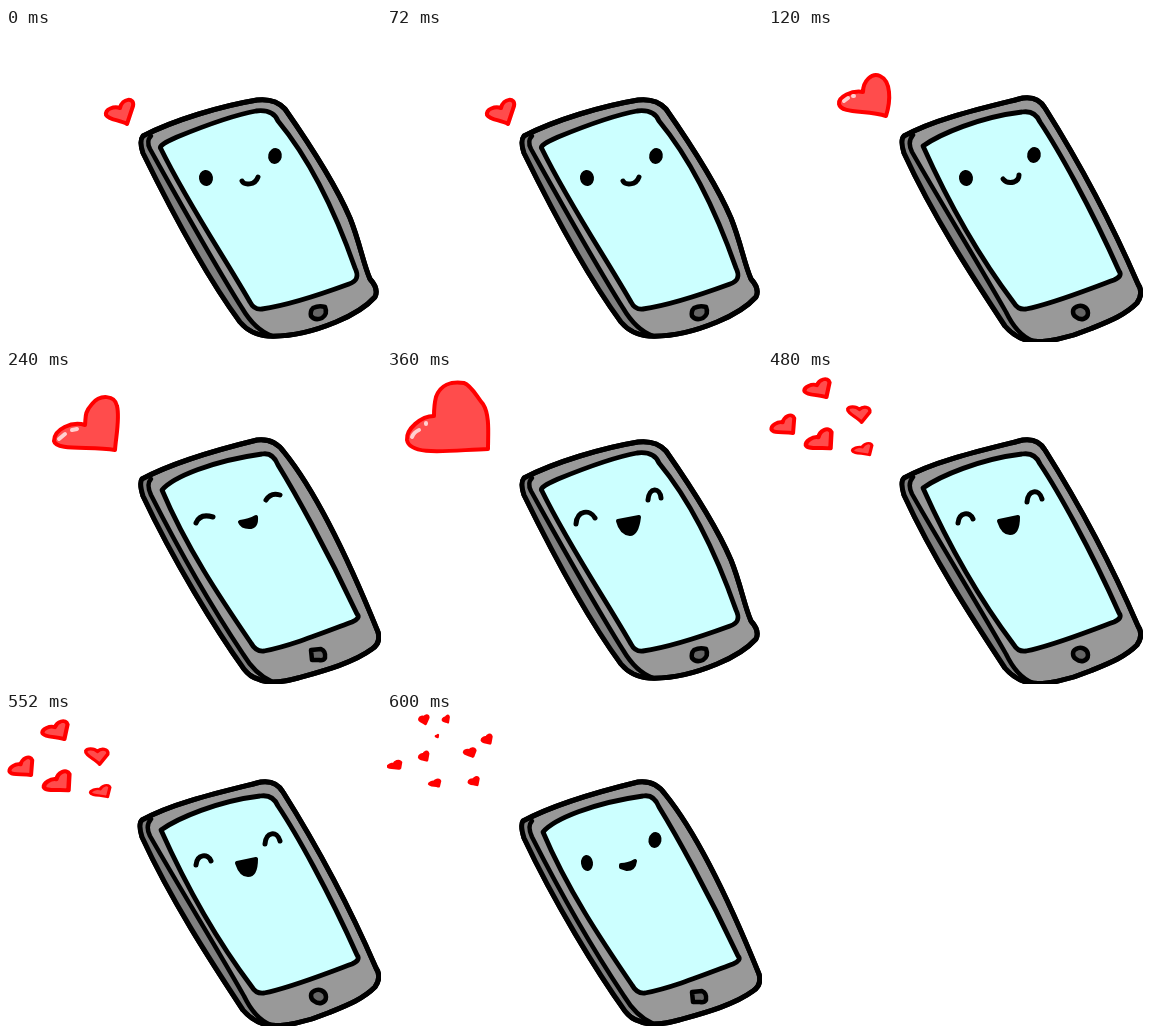
Recreate the animation shown at these times as an HTML page. Size 375 by 314 pixels, loop 720 ms.

```html
<!DOCTYPE html>
<html lang="en">
<head>
<meta charset="utf-8">
<title>Happy phone</title>
<style>
html, body { margin: 0; width: 100%; height: 100%; overflow: hidden; background: #fff; }
svg { display: block; width: 100%; height: 100%; }
path { stroke-linecap: round; stroke-linejoin: round; }
</style>
</head>
<body>
<svg id="stage" viewBox="0 0 375 314"></svg>
<script>
const HOLD = 120;
const path = (d, fill = 'none', stroke = '#000', width = 5) =>
  `<path d="${d}" fill="${fill}" stroke="${stroke}" stroke-width="${width}"/>`;
const oval = (x, y, rx, ry, tilt = 0) =>
  `<ellipse cx="${x}" cy="${y}" rx="${rx}" ry="${ry}" transform="rotate(${tilt} ${x} ${y})"/>`;

// Three wobbling drawings of the phone: case, front edge, screen, button
const phone = ([shell, edge, screen, button]) =>
  path(shell, '#999') +
  path(edge + ' L236 297 C205 250 166 184 137 124 Q133 111 138 108 Z', '#808080', 'none', 0) +
  path(shell) + path(edge, 'none', '#000', 4.5) +
  path(screen, '#cff', '#000', 4.8) + path(button, '#666', '#000', 4.5);

const bodies = [
  ['M137 108 C168 92 215 78 251 72 Q269 70 279 81 C302 114 329 155 344 190 C354 215 357 235 364 251 Q373 261 369 269 C360 279 347 287 330 294 C306 304 282 309 262 308 Q245 307 234 294 C203 252 166 184 137 125 Q133 113 137 108 Z',
   'M145 108 Q140 113 144 121 C177 180 207 234 236 280 Q249 302 266 308',
   'M155 121 C152 118 160 114 171 109 C198 98 228 87 250 83 Q267 81 272 93 C306 134 330 186 349 240 Q355 252 343 256 C313 267 284 277 256 281 Q248 282 244 274 C217 227 182 176 155 121 Z',
   'M307 280 Q313 277 319 279 Q322 286 316 290 Q309 293 305 288 Q304 283 307 280 Z'],
  ['M136 108 C166 91 215 80 255 70 Q270 68 277 80 C311 134 344 196 370 256 Q376 265 369 275 C356 288 339 294 322 301 C301 310 277 315 263 313 Q248 311 237 298 C204 248 165 188 136 125 Q132 112 136 108 Z',
   'M145 107 Q139 114 144 124 C176 180 209 233 238 284 Q249 307 265 313',
   'M155 118 C172 106 212 89 254 84 Q267 82 272 94 C290 121 322 178 351 243 Q355 248 346 252 C313 264 284 276 258 281 Q250 282 246 275 C212 230 181 176 155 118 Z',
   'M308 279 C313 276 320 279 320 285 C320 291 313 293 308 289 C304 286 304 281 308 279 Z'],
  ['M136 109 C168 92 214 79 251 70 Q268 68 278 82 C308 119 340 183 372 262 Q375 273 366 279 C347 293 317 301 292 308 C274 313 260 313 252 309 Q244 307 238 299 C210 260 167 190 137 126 Q133 113 136 109 Z',
   'M145 109 Q140 114 145 125 C175 184 211 245 237 284 Q249 304 265 311',
   'M156 120 C167 107 206 91 256 84 Q267 82 272 95 C288 121 320 178 351 244 Q355 248 346 252 C314 264 284 276 258 281 Q250 282 245 273 C215 229 180 177 156 120 Z',
   'M305 280 L315 279 Q320 281 319 288 Q317 291 313 290 L306 290 Z']
].map(phone);

const openEyes = (x, y, u, v) => oval(x, y, 7, 8, -8) + oval(u, v, 6.8, 8, 12);
const faces = [
  openEyes(200, 150, 269, 128) + path('M236 153 C238 157 249 158 252 149'),
  openEyes(198, 150, 266, 127) + path('M235 151 Q239 156 246 154 Q251 152 251 147'),
  path('M190 153 Q194 143 207 147 M260 130 Q265 122 274 125') +
    path('M234 152 Q243 151 250 147 Q251 157 243 157 Q236 157 234 152 Z', '#000', '#000', 4),
  path('M189 154 C190 140 203 139 208 148 M261 130 C262 117 273 117 274 128') +
    path('M231 151 L252 147 Q250 164 243 164 Q234 163 231 151 Z', '#000', '#000', 4),
  path('M190 153 C191 142 202 141 205 149 M259 132 C260 120 271 118 274 129') +
    path('M231 151 L250 147 Q250 163 242 163 Q235 163 231 151 Z', '#000', '#000', 4),
  oval(200, 151, 6, 8, -8) + oval(268, 128, 6.5, 8, 12) +
    path('M234 153 Q241 153 248 149 Q247 157 240 157 L234 155 Z', '#000', '#000', 4)
];

const heart = (d, width = 4, fill = '#ff4c4c') => path(d, fill, '#f00', width);
const shine = d => path(d, 'none', '#ffd0d0', 4);
// Unit heart with its point at the lower right
const small = 'M8 10 L11 -6 C9 -13 1 -9 -1 -3 C-6 -5 -13 -1 -13 3 C-12 8 0 7 8 10 Z';
const scatter = (list, ...style) => list.map(([x, y, w, h, tilt]) =>
  `<g transform="translate(${x} ${y}) rotate(${tilt}) scale(${w} ${h})">${heart(small, ...style)}</g>`).join('');
const group = [[50, 18, 1.05, .92, 0], [91, 42, .88, .8, 27], [16, 55, 1, .92, -7],
               [52, 70, 1.13, .99, -9], [95, 79, .81, .6, 0]];
const specks = [[37, 7, .34, .4, 15], [59, 7, .26, .32, 0], [50, 24, .14, .16, 0],
                [100, 27, .38, .4, 0], [37, 44, .36, .4, 0], [83, 40, .42, .38, 10],
                [8, 53, .5, .36, -5], [48, 71, .42, .32, 0], [87, 69, .38, .37, 0]];
const hearts = [
  heart('M121 96 L127 78 C129 69 116 70 114 80 C108 78 99 81 100 87 C103 92 114 92 121 96 Z'),
  heart('M118 88 C123 72 123 53 112 48 C104 44 95 53 95 64 C84 62 70 69 71 76 C73 86 99 82 118 88 Z') +
    shine('M76 73 L80 70 M85 68 L86 68'),
  heart('M109 80 C110 66 114 48 111 36 C109 25 94 24 86 34 C78 43 80 47 79 55 C66 51 48 59 48 71 C50 81 84 76 109 80 Z') +
    shine('M53 69 L59 64 M66 60 L71 59'),
  heart('M101 79 C101 64 103 45 96 34 C90 27 84 15 77 13 C64 11 53 15 49 27 Q47 35 47 46 C34 46 19 59 20 70 C23 87 65 80 101 79 Z') +
    shine('M25 67 Q27 62 32 60 M39 53 L39 54'),
  scatter(group),
  scatter(specks, 8, '#f00')
];

const stage = document.getElementById('stage');
stage.innerHTML = faces.map((face, i) =>
  `<g>${bodies[i % 3]}${face}${hearts[i]}</g>`).join('');
const poses = [...stage.children];

function draw(now) {
  const current = Math.floor(now / HOLD) % poses.length;
  poses.forEach((pose, i) => pose.style.display = i === current ? '' : 'none');
}
const start = performance.now();
function tick() {
  draw(performance.now() - start);
  requestAnimationFrame(tick);
}
tick();
</script>
</body>
</html>
```
